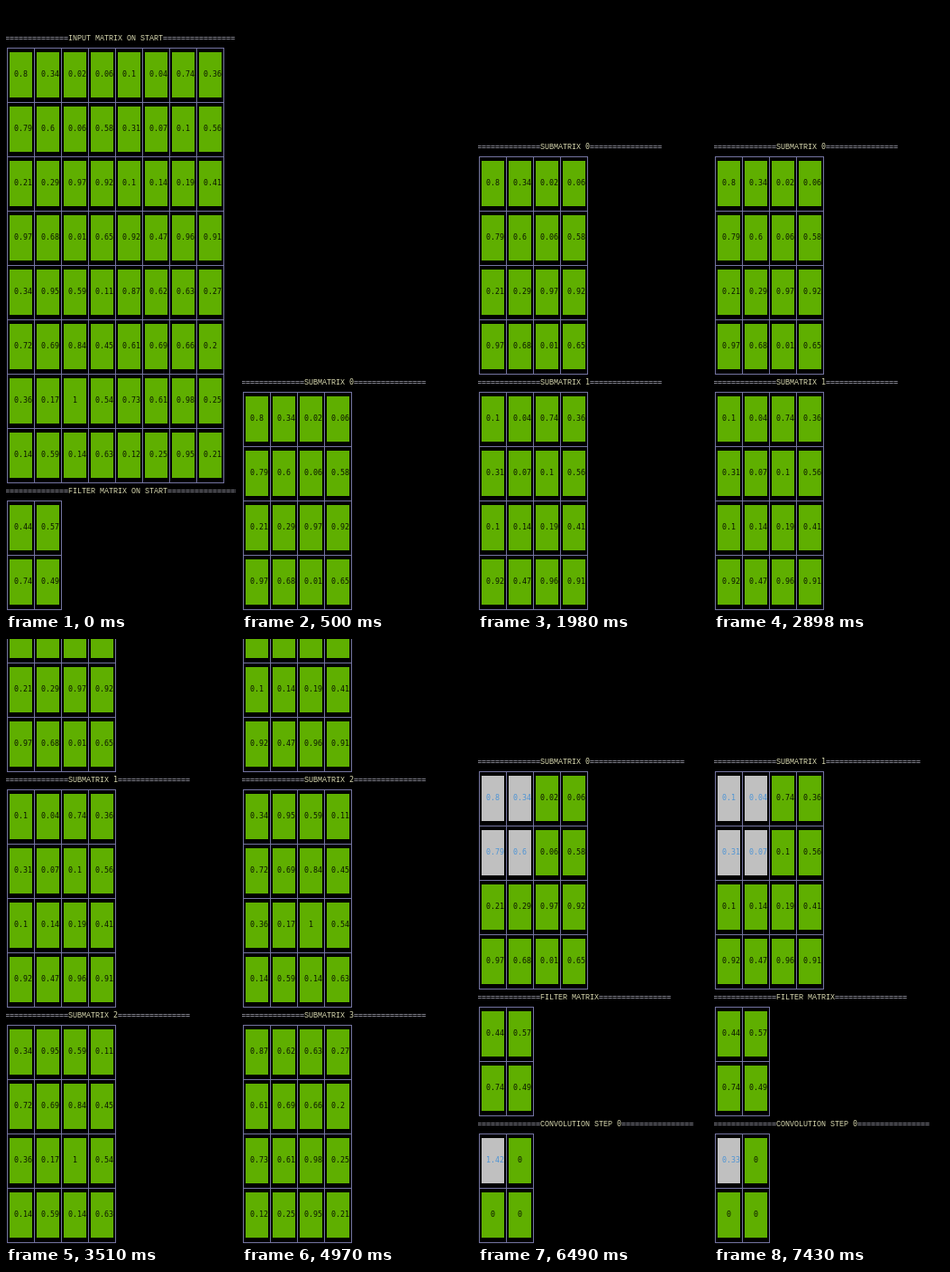
An HTML page for the animation above (8000 ms loop, 255 by 668 pixels).

```html
<!DOCTYPE html>
<html lang="en">
<head>
<meta charset="utf-8">
<title>Matrix convolution in a terminal</title>
<style>
html, body { margin: 0; width: 100%; height: 100%; overflow: hidden; background: #000; }
#strip { display: flex; width: 1785px; height: 668px; animation: cut 8s step-end infinite; }
#strip svg { flex: none; width: 255px; height: 668px; overflow: hidden; }
text { font: 8.305px "DejaVu Sans Mono", monospace; white-space: pre; fill: #0c1600; }
.label { font: 8.333px "Liberation Mono", monospace; fill: #d7d7af; }
.count { fill: #d7d7af; }
.rule { fill: #a9a9b8; }
.grid { fill: none; stroke: #7373a0; }
.cell { fill: #5faf00; }
.hot { fill: #c0c0c0; }
.hotText { fill: #4f94d4; }
@keyframes cut {
  0% { transform: translateX(0); }
  6.25% { transform: translateX(-255px); }
  24.75% { transform: translateX(-510px); }
  43.875% { transform: translateX(-765px); }
  62.125% { transform: translateX(-1020px); }
  81.125% { transform: translateX(-1275px); }
  92.875%, 100% { transform: translateX(-1530px); }
}
</style>
</head>
<body>
<div id="strip"></div>
<script>
const CHAR = 5, LINE = 10, COL = 30, ROW = 60, LEFT = -1;

const parse = s => s.split('/').map(r => r.trim().split(' '));
const input = parse(`0.8 0.34 0.02 0.06 0.1 0.04 0.74 0.36/
  0.79 0.6 0.06 0.58 0.31 0.07 0.1 0.56/
  0.21 0.29 0.97 0.92 0.1 0.14 0.19 0.41/
  0.97 0.68 0.01 0.65 0.92 0.47 0.96 0.91/
  0.34 0.95 0.59 0.11 0.87 0.62 0.63 0.27/
  0.72 0.69 0.84 0.45 0.61 0.69 0.66 0.2/
  0.36 0.17 1 0.54 0.73 0.61 0.98 0.25/
  0.14 0.59 0.14 0.63 0.12 0.25 0.95 0.21`);
const filter = parse('0.44 0.57/0.74 0.49');

const quarter = n => {
  const r = n >> 1 << 2, c = (n & 1) << 2;
  return input.slice(r, r + 4).map(row => row.slice(c, c + 4));
};

const text = (x, y, s, cls = '') => `<text class="${cls}" x="${x}" y="${y}">${s}</text>`;

function heading(top, words, tail = 16) {
  const y = top + 7, x = LEFT + 14 * CHAR;
  const label = words.replace(/\d+$/, '');
  const count = words.slice(label.length);
  return text(LEFT, y, '='.repeat(14), 'rule') +
    text(x, y, label, 'label') +
    text(x + label.length * CHAR, y, count, 'count') +
    text(x + words.length * CHAR, y, '='.repeat(tail), 'rule');
}

// The top-left block of size `hot` is highlighted.
function table(top, rows, hot = 0) {
  const w = rows[0].length * COL, h = rows.length * ROW;
  const x0 = 1.5, y0 = top + 5.5;
  let path = '', cells = '';
  for (let r = 0; r <= rows.length; r++) path += `M${x0 - .5} ${y0 + r * ROW}h${w + 1}`;
  for (let c = 0; c <= rows[0].length; c++) path += `M${x0 + c * COL} ${y0}v${h}`;
  rows.forEach((row, r) => row.forEach((value, c) => {
    const on = r < hot && c < hot;
    const x = 4 + c * COL, y = top + LINE + r * ROW;
    const pad = value.length === 1 ? 2 : 1;
    cells += `<rect class="${on ? 'hot' : 'cell'}" x="${x}" y="${y}" width="25" height="50"/>` +
      text(x + pad * CHAR, y + 2 * LINE + 7, value, on ? 'hotText' : '');
  }));
  return `<path class="grid" d="${path}"/>` + cells;
}

const block = (top, words, rows, hot, tail) =>
  heading(top, words, tail) + table(top + LINE, rows, hot);

const sub = (top, n, hot, tail) => block(top, 'SUBMATRIX ' + n, quarter(n), hot, tail);

const listing = last => {
  let out = '';
  for (let n = 0; n <= last; n++) out += sub(411 - (last - n) * 260, n);
  return out;
};

const step = (n, sum) => sub(131, n, 2, 21) +
  block(391, 'FILTER MATRIX', filter) +
  block(531, 'CONVOLUTION STEP 0', [[sum, '0'], ['0', '0']], 1);

const screens = [
  block(31, 'INPUT MATRIX ON START', input) + block(531, 'FILTER MATRIX ON START', filter),
  listing(0), listing(1), listing(2), listing(3),
  step(0, '1.42'), step(1, '0.33')
];

document.getElementById('strip').innerHTML =
  screens.map(s => `<svg viewBox="0 0 255 668">${s}</svg>`).join('');
</script>
</body>
</html>
```
